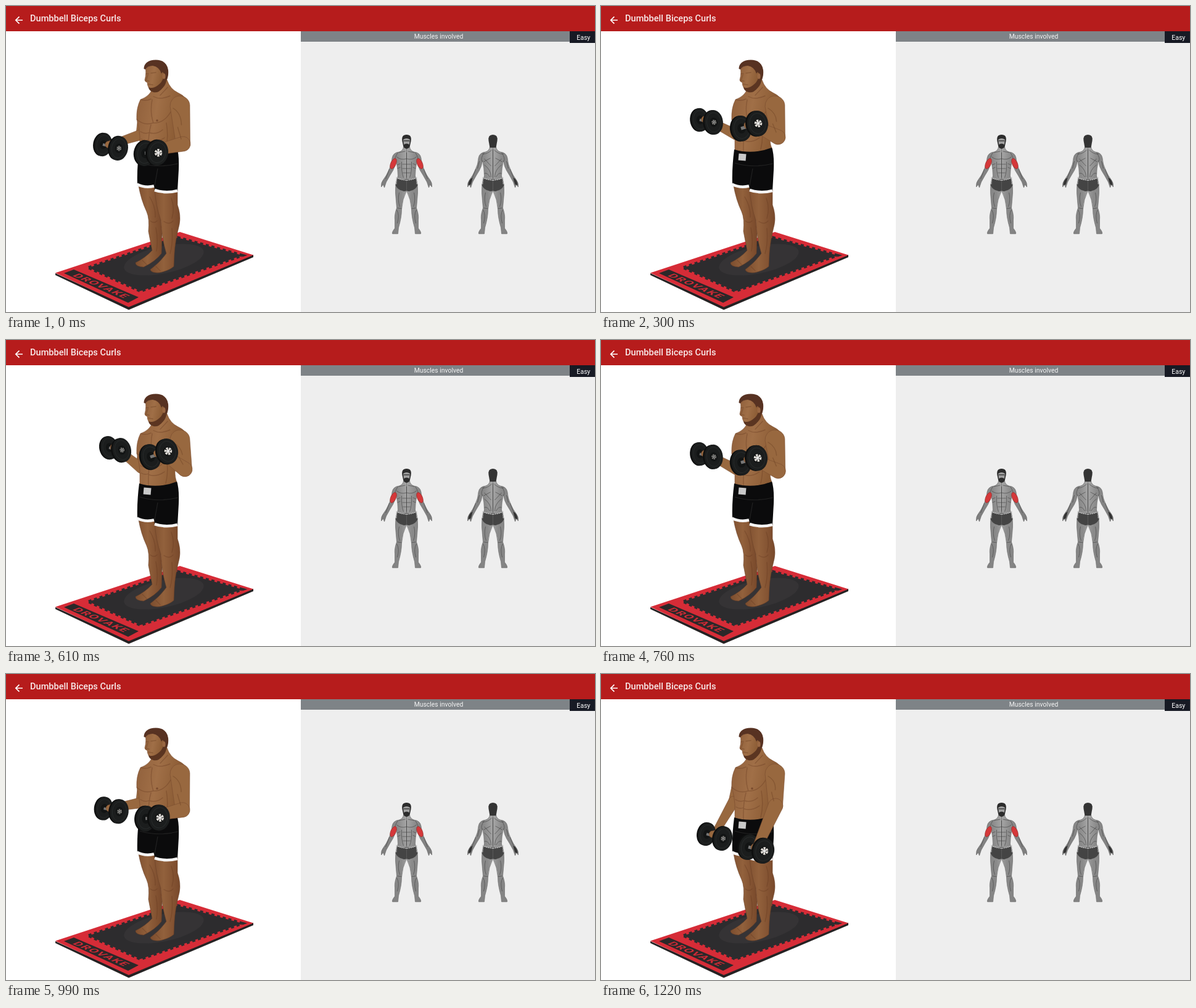
Animation of 955x497 px, one loop 1300 ms. Source, as an HTML page:

```html
<!DOCTYPE html>
<html lang="en">
<head>
<meta charset="utf-8">
<title>Dumbbell Biceps Curls</title>
<style>
  html, body { margin: 0; width: 100%; height: 100%; overflow: hidden; background: #fff; }
  svg { display: block; font-family: Roboto, sans-serif; }
  .skin { fill: url(#skin); stroke: #77492d; stroke-width: .6; }
  .leg { fill: url(#leg); stroke: #6b4128; stroke-width: .6; }
  .arm { fill: #98683f; stroke: #7a4c2f; stroke-width: .6; }
  .crease { fill: none; stroke: #64391f; stroke-width: 1.4; opacity: .36; stroke-linecap: round; }
  .line { fill: none; stroke: #444; stroke-width: .9; opacity: .7; }
</style>
</head>
<body>
<svg width="955" height="497" viewBox="0 0 955 497">
  <defs>
    <linearGradient id="skin" x2="1" y2=".25">
      <stop offset="0" stop-color="#8f5f3b"/><stop offset=".45" stop-color="#a06f47"/><stop offset="1" stop-color="#85562f"/>
    </linearGradient>
    <linearGradient id="leg">
      <stop offset="0" stop-color="#7c4d2e"/><stop offset=".45" stop-color="#92613c"/><stop offset="1" stop-color="#79492b"/>
    </linearGradient>
    <linearGradient id="gray" x2="1" y2=".3">
      <stop offset="0" stop-color="#a8a8a8"/><stop offset=".35" stop-color="#8a8a8a"/><stop offset="1" stop-color="#7d7d7d"/>
    </linearGradient>
    <g id="plate">
      <ellipse cx="-2" rx="17" ry="21" fill="#0e0f0f"/>
      <ellipse cx="1" rx="17" ry="21" fill="#1b1d1d"/>
      <ellipse cx="1" rx="13" ry="16.5" fill="none" stroke="#272a2a"/>
      <ellipse cx="1" rx="7" ry="8" fill="#121414"/>
    </g>
    <g id="hub">
      <circle cx="2" r="4" fill="#666" stroke="#e2ded8" stroke-width="4.6" pathLength="6" stroke-dasharray=".68 .32"/>
      <circle cx="2" r="2" fill="#eee"/>
    </g>
    <g id="half">
      <path fill="url(#gray)" stroke="#666" stroke-width=".6" d="M0 229H5Q6 235 12 237Q22 238 23.500 247Q24 257 29 267Q33 276 37 281Q42 287 41 294L38 290 36 295 33 286Q27 275 22 267Q18 260 17 251Q14 264 14 276Q19 289 18 304Q17 317 16 328Q20 339 19 347L19 361Q24 367 23 370H14L13 360Q8 343 8 330Q7 314 0 300Z"/>
      <path class="line" d="M14 238Q21 248 17 253M22 252L25 264M28 265L34 281M12 303Q15 315 11 326M16 331Q11 339 15 353M8 329L15 328"/>
      <path fill="#444" d="M0 281Q9 283 16 280L18 291Q14 299 7 300Q4 302 0 300Z"/>
      <path fill="none" stroke="#bbb" stroke-width="1.800" stroke-dasharray="2 1" d="M0 283Q9 282 16 279L17 290"/>
    </g>
    <g id="figure">
      <use href="#half"/><use href="#half" transform="scale(-1 1)"/>
    </g>
    <g id="chest">
      <path class="line" d="M0 238V279M0 248Q9 251 16 245M0 257H7M0 264H7M0 271H6M8 253Q9 268 5 279M10 256l5 2M10 262l5 2M2 236L13 238"/>
      <ellipse cx="21.5" cy="256" rx="4.200" ry="9" fill="#d5383a" stroke="#96302e" stroke-width=".7" transform="rotate(-24 21.5 256)"/>
    </g>
    <path id="back" class="line" d="M0 233V279M2 234Q11 242 18 240M3 260L14 248M4 247L15 253M3 278Q3 266 14 258M5 278Q9 270 14 272"/>
  </defs>

  <rect width="955" height="41" fill="#b61c1c"/>
  <path d="M27 23H16M21.5 17.3L15.8 23l5.7 5.7" fill="none" stroke="#fff" stroke-width="1.7"/>
  <text x="39" y="25" font-size="14.600" font-weight="500" fill="#f8e9e9">Dumbbell Biceps Curls</text>

  <rect x="478" y="41" width="477" height="456" fill="#eee"/>
  <rect x="478" y="41" width="477" height="17" fill="#7e8387"/>
  <text x="701.5" y="53" font-size="10.4" text-anchor="middle" fill="#f4f4f4">Muscles involved</text>
  <rect x="914" y="41" width="41" height="19" fill="#171a24"/>
  <text x="936.3" y="55" font-size="10.5" text-anchor="middle" fill="#fff">Easy</text>

  <g transform="translate(649.5 0)">
    <use href="#figure"/>
    <use href="#chest"/><use href="#chest" transform="scale(-1 1)"/>
    <path fill="#2c2c2c" d="M-7 220Q-9 209 0 209Q9 209 7 220L5 229Q0 235-5 229Z"/>
    <path fill="#a0a0a0" d="M-5.500 217Q0 213 5.500 217L4.500 225Q0 222-4.500 225Z"/>
    <path fill="none" stroke="#3c3c3c" stroke-width="1.500" d="M-5 219H5"/>
  </g>
  <g transform="translate(789.5 0)">
    <use href="#figure"/>
    <use href="#back"/><use href="#back" transform="scale(-1 1)"/>
    <path fill="#343434" d="M-7 219Q-8.500 209 0 209Q8.500 209 7 219L5 230H-5Z"/>
    <path id="palm" fill="#333" d="M33 279Q39 281 40 291L36 290 34 284Z"/>
    <use href="#palm" transform="scale(-1 1)"/>
  </g>

  <g id="mat">
    <path fill="#252223" d="M80 434L199 488 401 404V408L199 493.500 80 437Z"/>
    <path fill="#d62c37" d="M80 433.500L282 367 401 404.500 199 489Z"/>
    <path fill="#2d2c2e" stroke="#2d2c2e" stroke-width="5" stroke-dasharray="5 4.500" d="M134 425L278 376 383 405 218 463Z"/>
    <ellipse cx="256" cy="412" rx="66" ry="22" fill="#353335" transform="rotate(-12 256 412)"/>
    <path fill="#2b2829" d="M94 434L110 428 215 473 198 482Z"/>
    <text transform="matrix(.908 .395 -.8 .3 107 438)" font-size="18.500" font-weight="700" letter-spacing="1.700" fill="#d02a35">DROVAKE</text>
  </g>

  <path id="farUpper" class="arm"/><path id="farFore" class="arm"/>
  <use id="C" href="#plate"/>
  <path id="farBar" stroke="#777" stroke-width="4"/><path id="farHand" class="arm"/>
  <g id="D"><use href="#plate"/><use href="#hub" transform="scale(.7)" opacity=".55"/></g>

  <g id="body">
    <path class="leg" d="M215 292Q219 315 228 334Q233 345 231 366L237 397Q226 409 210 417Q210 423 223 424Q242 415 252 402L253 370Q251 340 243 292Z"/>
    <path class="leg" d="M241 298Q243 325 251 348Q252 375 260 402Q249 417 234 428Q235 434 249 433Q264 430 272 423L273 402Q274 383 281 355Q284 340 278 323V298Z"/>
    <path class="crease" d="M233 310Q243 327 242 343M234 349q6 5 11 0M243 360Q247 380 244 398M268 312Q274 328 269 345M256 350q9 6 15-1M269 361Q271 385 266 402M221 413l7 7M243 423l7 7"/>
    <path class="skin" d="M237 134Q234 146 218 152Q211 166 212 184Q216 197 217 212L217 238Q247 247 278 234Q271 218 276 200Q292 180 297 164Q295 148 279 141Q266 135 261 120Z"/>
    <path class="crease" d="M212 184Q224 195 238 190Q256 191 267 172M237 152Q233 172 239 190M235 193Q230 211 231 236M218 204q8 5 15 1M219 216q7 4 12 1M233 206Q245 209 254 201M232 219Q245 223 257 214M260 190Q264 213 259 233M239 147Q250 153 266 146M250 145L262 132M219 152Q227 155 235 151"/>
    <circle cx="245" cy="186" r="1.8" fill="#6b3d25" opacity=".7"/>
    <path fill="#0b0b0c" d="M216 233Q246 242 277 230Q281 241 280 266L278 301Q260 306 241 299L240 292Q226 296 213 290Q212 264 216 233Z"/>
    <path fill="none" stroke="#222" stroke-width="1.200" d="M217 255Q246 264 279 256M246 264L241 292"/>
    <path fill="none" stroke="#f7f7f7" stroke-width="4.500" d="M212.500 289.500Q225 296 240 292.500M241 299Q259 305 278 300"/>
    <rect x="223" y="240" width="12" height="11" fill="#c9c9c9" transform="rotate(5 229 246)"/>
    <path class="skin" d="M226 101Q228 109 225 120Q225 123 229 124Q229 133 237 138Q248 141 257 129Q264 117 261 102Q246 88 226 101Z"/>
    <path fill="#5b3521" d="M231 132Q238 135 246 129Q253 124 255 117L260 114Q261 126 254 133Q247 142 239 140Q232 138 231 132Z"/>
    <path fill="#573222" d="M223.500 102Q224 88 243 87.500Q261 88 263 104Q264 114 260 121L257 112Q254 104 252 110Q249 99 238 97Q229 97 226 103Z"/>
    <ellipse cx="256" cy="114" rx="2.600" ry="4.500" fill="#9a6843"/>
    <path class="crease" d="M227 110h4M235 109l8-1M230 112l-3 9 5 1M231 127l7 1"/>
  </g>

  <use id="A" href="#plate"/>
  <path id="bar" stroke="#777" stroke-width="5"/>
  <path id="upper" class="arm"/><path id="fore" class="arm"/><path id="hand" class="arm"/>
  <path id="armCrease" class="crease"/>
  <g id="B"><use href="#plate"/><use href="#hub"/></g>
</svg>

<script>
const LOOP = 1300, STEPS = 17;
const el = id => document.getElementById(id);
const setPath = (id, d) => el(id).setAttribute('d', d);

// step, then points C, D (far plates), A, B (near plates), near elbow, far elbow, plate tilt
const poses = [
  [0, 157, 225, 182, 231, 225, 239, 245, 238, 287, 224, 219, 209, 10],
  [2, 156, 199, 179, 203, 224, 213, 247, 207, 286, 217, 219, 212, 2],
  [4, 160, 185, 182, 189, 227, 199, 253, 191, 287, 213, 219, 209, -6],
  [8, 167, 175, 187, 179, 234, 190, 261, 181, 290, 210, 219, 208, -13],
  [11, 157, 194, 180, 199, 224, 208, 248, 202, 286, 215, 219, 211, -1],
  [14, 161, 232, 186, 237, 229, 250, 250, 251, 286, 222, 218, 208, 10],
  [16, 171, 260, 197, 267, 239, 281, 263, 287, 283, 214, 215, 207, 12]
];

// Smooth curve through the poses
function poseAt(step) {
  let k = 0;
  while (k < poses.length - 2 && poses[k + 1][0] <= step) k++;
  const at = i => poses[Math.max(0, Math.min(poses.length - 1, i))];
  const [o, p, q, r] = [at(k - 1), at(k), at(k + 1), at(k + 2)];
  const span = q[0] - p[0], u = (step - p[0]) / span;
  return p.slice(1).map((v, j) => {
    const i = j + 1;
    const m0 = (q[i] - o[i]) / (q[0] - o[0]) * span;
    const m1 = (r[i] - p[i]) / (r[0] - p[0]) * span;
    const d = q[i] - v;
    return v + u * (m0 + u * (3 * d - 2 * m0 - m1 + u * (m0 + m1 - 2 * d)));
  });
}

// Tapered limb with round ends
function limb([x1, y1], r1, [x2, y2], r2) {
  const len = Math.hypot(x2 - x1, y2 - y1) || 1;
  const nx = (y1 - y2) / len, ny = (x2 - x1) / len;
  return `M${x1 + nx * r1} ${y1 + ny * r1}A${r1} ${r1} 0 0 1 ${x1 - nx * r1} ${y1 - ny * r1}` +
    `L${x2 - nx * r2} ${y2 - ny * r2}A${r2} ${r2} 0 0 1 ${x2 + nx * r2} ${y2 + ny * r2}Z`;
}

const mix = (a, b, u) => [a[0] + (b[0] - a[0]) * u, a[1] + (b[1] - a[1]) * u];
const line = (a, b) => `M${a}L${b}`;

function draw(step) {
  const v = poseAt(step), tilt = v[12];
  const [C, D, A, B, elbow, farElbow] = [0, 2, 4, 6, 8, 10].map(i => [v[i], v[i + 1]]);
  const place = (id, p, sx, sy) =>
    el(id).setAttribute('transform', `translate(${p}) rotate(${tilt}) scale(${sx} ${sy})`);
  place('C', C, .83, .91);
  place('D', D, .88, .95);
  place('A', A, .95, 1);
  place('B', B, 1, 1);

  const grip = mix(A, B, .6), farGrip = mix(C, D, .5);
  grip[1] -= 3;
  farGrip[1] -= 3;
  setPath('farBar', line(C, D));
  setPath('farUpper', limb([224, 170], 9, farElbow, 8));
  setPath('farFore', limb(farElbow, 8.5, farGrip, 5.5));
  setPath('farHand', limb(mix(farGrip, C, .25), 5.5, farGrip, 6.5));

  const shoulder = [282, 162];
  setPath('bar', line(A, B));
  setPath('upper', limb(shoulder, 16, elbow, 11.5));
  setPath('fore', limb(elbow, 12, grip, 7.5));
  setPath('hand', limb(mix(grip, A, .3), 6, grip, 8));
  const mid = mix(shoulder, elbow, .5);
  setPath('armCrease', `M271 166Q284 174 ${mid}M${mid[0] - 6} ${mid[1] + 4}L${elbow[0] - 3} ${elbow[1] - 8}`);
}

function tick() {
  const t = performance.now() % LOOP;
  draw(Math.min(STEPS - 1, Math.floor((t + 7) * STEPS / LOOP)));
  requestAnimationFrame(tick);
}
tick();
</script>
</body>
</html>
```
